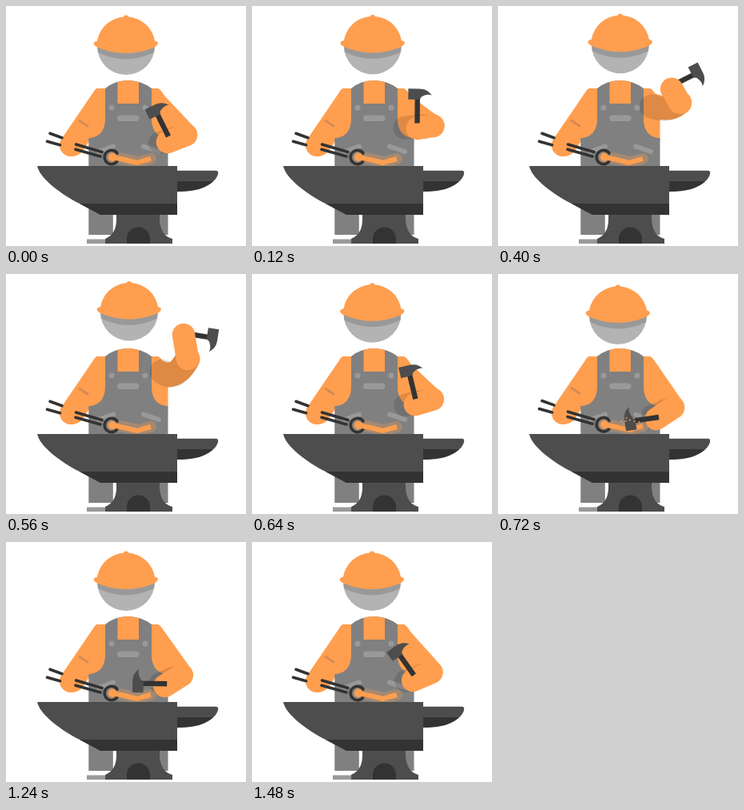
Recreate the animation shown at these times as an HTML page. Size 300 by 300 pixels, loop 1520 ms.

```html
<!DOCTYPE html>
<html lang="en">
<head>
<meta charset="utf-8">
<title>Blacksmith</title>
<style>
  html, body { margin: 0; width: 100%; height: 100%; overflow: hidden; background: #fff; }
  svg { display: block; width: 100%; height: 100%; }
  .skin { fill: #ff9e4f; }
  .cloth { fill: #808080; }
  .light { fill: #999; }
  .iron { fill: #4d4d4d; }
  .dark { fill: #333; }
  .line { fill: none; stroke-linecap: round; stroke-linejoin: round; }
</style>
</head>
<body>
<svg viewBox="0 0 300 300">
  <!-- legs, shirt, upper arm, overalls -->
  <path class="light" d="M101 291.500h24v5.500h-24z"/>
  <path class="cloth" d="M103.300 200h30.500v86h-30.500zM172 200h30.500v86h-30.500zM184 291.500h24v5.500h-24z"/>
  <path class="skin" d="M124 103H115L103.300 121V170H202.500V120Q194 104 190 103H182Z"/>
  <path id="upper" class="line" stroke="#ff9e4f"/>
  <path class="skin" d="M124 103H117Q112 102 109 108L69.500 166C63 177 71 188 81 188Q91 188 96 181L124 138Z"/>
  <path class="cloth" d="M124 103Q136 93 152.500 93T182 103V141C182 156 190 165 202.500 165V202H103.300V165C116 165 124 156 124 141Z"/>
  <path class="skin" d="M139.500 95Q152 91 166 95V122H139.500Z"/>
  <g class="light">
    <circle cx="132" cy="127" r="3.500"/>
    <circle cx="174" cy="127" r="3.500"/>
    <rect x="139" y="136.500" width="27.500" height="7.500" rx="3.700"/>
  </g>
  <path class="line" stroke="#999" stroke-width="6" d="M172 175.500L191 182M134 175.500L116 182"/>

  <g id="head">
    <circle cx="150" cy="50" r="36" fill="#b3b3b3"/>
    <path class="light" d="M114 47H186L185 58Q150 75 115 58Z"/>
    <path class="skin" d="M114 43.500A36.500 36.500 0 0 1 147 13.500Q147 11.500 150 11.500T153 13.500A36.500 36.500 0 0 1 186 43.500Q190 44 190 47Q188 51 182 53Q150 65 118 53Q111 51 109.500 47Q110 44 114 43.500Z"/>
  </g>

  <!-- left hand, hot metal and tongs -->
  <g id="left">
    <circle class="skin" cx="81.500" cy="174" r="14"/>
    <path class="line" stroke="#d68a50" stroke-width="3" d="M92 143.500L102 150"/>
    <path class="line" stroke="#ff9e4f" stroke-opacity=".28" stroke-width="14" d="M133 189L148 191 165 195 181 191"/>
    <path class="line" stroke="#333" stroke-width="3.600" d="M55 159.300L70 164.700M51.500 169.300L67.500 173.700M87.500 173L120 182.500M87 179.300L118 188M139 184A8.700 8.700 0 1 0 139 194"/>
    <path class="line" stroke="#ff9e4f" stroke-width="6" stroke-linejoin="miter" style="stroke-linecap:butt" d="M132 189L148 192 164 196 170 194 181 191"/>
    <circle class="skin" cx="133" cy="189" r="5"/>
  </g>

  <!-- right arm -->
  <path id="shade" class="line" stroke="#000" stroke-opacity=".13"/>
  <g id="behind"></g>
  <path id="fore" class="line" stroke="#ff9e4f" stroke-width="28.500"/>
  <g id="front">
    <g id="hammer">
      <path class="dark" d="M0-3.200H31V3.200H0Z"/>
      <path class="iron" d="M29.500-11.500H43V2C43 10 40 14 35 18C37 13 35 9 33 5L29.500 3Z"/>
    </g>
  </g>
  <g id="sparks" class="skin"></g>

  <!-- anvil -->
  <path class="iron" d="M214 205.700H262Q266 205.700 265 210C262 222 244 231 214 232Z"/>
  <path class="dark" d="M214 219H259C250 228 236 232 214 232Z"/>
  <path class="iron" d="M138 258H192V267Q193 287 208 291V297H124V291Q138 285 138 267Z"/>
  <path class="dark" d="M151 297V291A14.500 14.500 0 0 1 180 291V297Z"/>
  <path class="iron" d="M39 200H214V261H118L92 247C68 235 42 215 39 200Z"/>
  <path class="dark" d="M92 247H214V261H118Z"/>
</svg>
<script>
const LOOP = 1520, STEP = 40, LIFT = 880, IMPACT = 680, SETTLED = 880;
const parts = Object.fromEntries(
  ["head", "left", "upper", "shade", "behind", "fore", "front", "hammer", "sparks"]
    .map(id => [id, document.getElementById(id)]));

// Joint positions along the lift, from resting on the anvil to fully raised.
const keys = [0, 320, 560, LIFT];
const joints = {
  hand:     [[198, 181], [202, 170], [212, 131], [222, 76]],
  elbow:    [[219, 167], [225, 161], [227, 136], [227, 106]],
  bend:     [[219, 167], [225, 161], [215, 135], [212, 135]],
  shadeIn:  [[193, 177], [192, 171], [190, 133], [195, 122]],
  shadeOut: [[207, 171], [211, 165], [222, 136], [226, 107]],
  grip:     [[201, 179], [203, 163], [211, 126], [222, 74]]
};

// Smooth curve through the key values.
function curve(values, x) {
  let i = 0;
  while (i < keys.length - 2 && x > keys[i + 1]) i++;
  const slope = k => {
    const a = Math.max(k - 1, 0), b = Math.min(k + 1, keys.length - 1);
    return (values[b] - values[a]) / (keys[b] - keys[a]);
  };
  const h = keys[i + 1] - keys[i], u = (x - keys[i]) / h, v = 1 - u;
  return values[i] * v * v * (1 + 2 * u) + values[i + 1] * u * u * (3 - 2 * u)
    + h * u * v * (slope(i) * v - slope(i + 1) * u);
}

const joint = (name, lift) => [0, 1].map(axis => curve(joints[name].map(p => p[axis]), lift));

function limb(part, from, bend, to, width) {
  part.setAttribute("d", `M${from}Q${bend} ${to}`);
  part.setAttribute("stroke-width", width);
}

function liftAt(t) {
  if (t <= 560) return 320 + t;
  if (t < 700) return LIFT * (700 - t) / 140;
  return Math.max(0, t - 1200);
}

function drawSparks(t) {
  const u = (t - IMPACT) / (SETTLED - IMPACT);
  let dots = "";
  if (u > 0 && u < 1) {
    for (let i = 0; i < 8; i++) {
      const angle = Math.PI * (1.05 + .12 * i), reach = (11 + i * 7 % 13) * Math.sqrt(u);
      const x = 164 + Math.cos(angle) * reach * 1.4;
      const y = 188 + Math.sin(angle) * reach + 6 * u * u;
      dots += `<circle cx="${x}" cy="${y}" r="${1.1 * (1 - u * .6)}"/>`;
    }
  }
  parts.sparks.innerHTML = dots;
}

function draw(t) {
  const lift = liftAt(t), at = name => joint(name, lift);
  const lean = Math.max(0, (lift - 320) / 560);
  const recoil = t >= IMPACT && t < SETTLED ? (SETTLED - t) / (SETTLED - IMPACT) : 0;
  parts.head.setAttribute("transform", `translate(${4 * lean} ${2.5 * (recoil - lean)})`);
  parts.left.setAttribute("transform", `translate(0 ${-recoil})`);

  const width = 28 + 3 * lean;
  limb(parts.upper, [188, 122], at("bend"), at("elbow"), width);
  limb(parts.shade, at("shadeIn"), at("bend"), at("shadeOut"), width);
  parts.fore.setAttribute("d", `M${at("elbow")}L${at("hand")}`);

  const layer = lift > 440 ? parts.behind : parts.front;
  if (parts.hammer.parentNode !== layer) layer.append(parts.hammer);
  parts.hammer.setAttribute("transform",
    `translate(${at("grip")}) rotate(${172 + 197 * lift / LIFT})`);

  drawSparks(t);
}

const start = performance.now();
function tick() {
  const t = (performance.now() - start) % LOOP;
  draw(Math.floor(t / STEP) * STEP);
  requestAnimationFrame(tick);
}
tick();
</script>
</body>
</html>
```
